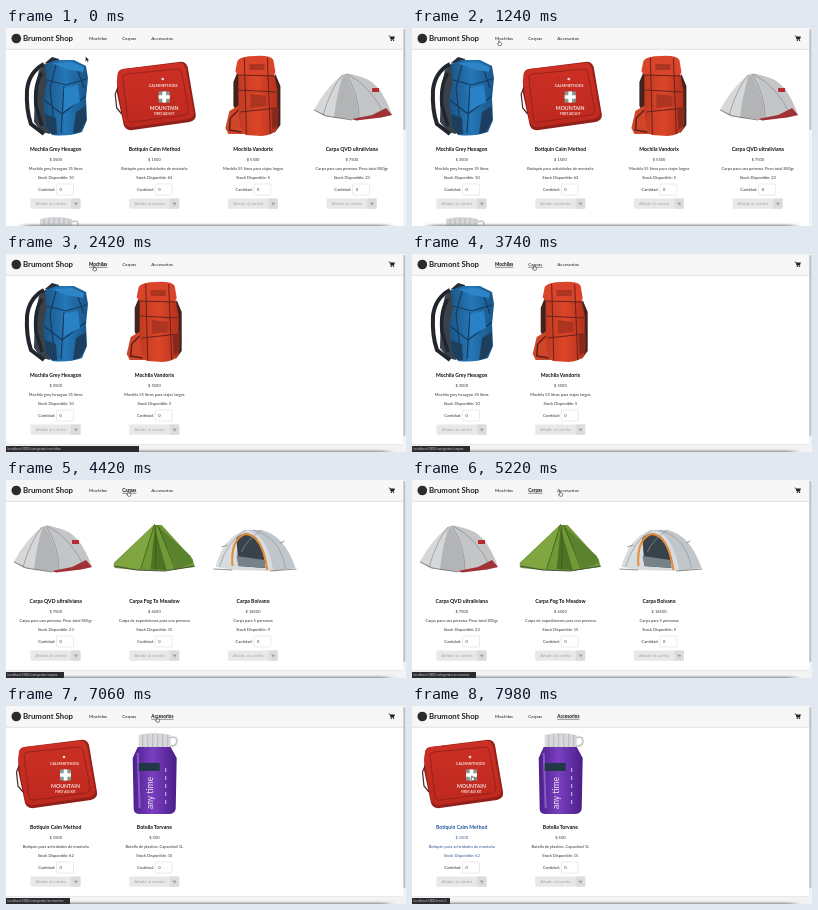
Write an HTML page that moves like this. It is 400 by 198 pixels and loops after 8000 ms.

```html
<!DOCTYPE html>
<html lang="es">
<head>
<meta charset="utf-8">
<title>Brumont Shop</title>
<style>
  html, body { margin: 0; width: 100%; height: 100%; overflow: hidden; background: #fff; }
  svg { display: block; width: 100%; height: 100%; font-family: Lato, sans-serif; }
  .brand { font-size: 7.8px; font-weight: 700; fill: #222; }
  .nav { font-size: 4.6px; fill: #222; }
  .nav.on { font-weight: 700; fill: #111; }
  .card text { font-size: 4px; text-anchor: middle; fill: #333; }
  .card .title { font-size: 5.1px; font-weight: 700; fill: #111; }
  .card .left { text-anchor: start; }
  .card .btn { font-size: 4.4px; fill: #a4a4a4; text-anchor: start; }
  .card.hover .link { fill: #33568a; }
  .card.hover .title { fill: #2859a0; }
  #status text { font: 3.3px Roboto, sans-serif; fill: #c4c4c8; }
</style>
</head>
<body>
<svg viewBox="0 0 400 198" preserveAspectRatio="none">
  <defs>
    <linearGradient id="blue"><stop stop-color="#1c5584"/><stop offset=".5" stop-color="#2477b8"/><stop offset="1" stop-color="#1a5688"/></linearGradient>
    <linearGradient id="red"><stop stop-color="#c23a22"/><stop offset=".5" stop-color="#dc4628"/><stop offset="1" stop-color="#b5301c"/></linearGradient>
    <linearGradient id="kit" x2="0" y2="1"><stop stop-color="#cd3025"/><stop offset="1" stop-color="#bd281e"/></linearGradient>
    <linearGradient id="violet"><stop stop-color="#4c1f8c"/><stop offset=".45" stop-color="#7a3fc0"/><stop offset="1" stop-color="#4a1e88"/></linearGradient>
    <filter id="soft" x="-10%" y="-300%" width="120%" height="700%"><feGaussianBlur stdDeviation="5 1.3"/></filter>
    <g id="cart">
      <path d="M-3 -2.3h1.3l.9 3.4h3" fill="none" stroke="currentColor" stroke-width=".7"/>
      <path d="M-1.6 -1.7h4.8l-.8 2.3h-3.4z" fill="currentColor"/>
      <circle cx="-.4" cy="2.1" r=".65" fill="currentColor"/><circle cx="1.9" cy="2.1" r=".65" fill="currentColor"/>
    </g>

    <g id="bluePack">
      <path d="M40 35L44 48L44 106L36 104L28 94L29 60L33 42Z" fill="#39424b"/>
      <path d="M38 36Q23 44 21 62Q20 82 25 96L38 106" fill="none" stroke="#20262c" stroke-width="4"/>
      <path d="M36 45Q28 56 30 78L36 98" fill="none" stroke="#20262c" stroke-width="3.500"/>
      <path d="M39 35L46 29L53 31L52 37Z" fill="#252d36"/>
      <path d="M39 36L50 32L68 32L80 38L82 50L80 70L81 92L76 104Q62 109 46 107L40 98L37 72L41 54Z" fill="url(#blue)"/>
      <path d="M41 52L60 57L80 51M38 72L56 86L80 68M58 58L55 105M50 37L44 60L49 104M70 37L78 60" fill="none" stroke="#14395c" stroke-width="1.100"/>
      <path d="M39 86L50 90L51 106L45 106L40 98ZM70 84L80 78L80 93L74 104L67 106Z" fill="#1c3f60"/>
      <path d="M58 60L72 57L74 74L58 82Z" fill="#2a82c6"/>
      <path d="M46 35L66 34L78 39L77 44L60 41Z" fill="#2d84c6"/>
    </g>
    <g id="redPack">
      <path d="M34 44L30 54L30 78L36 88L38 46ZM72 46L77 58L77 97L71 105L68 60Z" fill="#42231e"/>
      <path d="M36 77L26 83L22 100L25 106L42 106L42 84Z" fill="#cf4629"/>
      <path d="M35 82L27 90L26 102L38 104" fill="none" stroke="#5a2119" stroke-width="1.500"/>
      <path d="M34 33Q37 28 52 28Q67 27 70 32L72 44L70 49L35 48L32 43Z" fill="#d9442a"/>
      <path d="M35 47L71 47L74 62L74 101Q70 107 58 108L42 107L37 100L35 84Z" fill="url(#red)"/>
      <path d="M34 47L72 48M41 30L43 106M64 30L67 106M35 62L73 64M37 84L74 80" fill="none" stroke="#66231b" stroke-width="1"/>
      <path d="M46 36H61V42H46ZM47 66L63 68V78L47 80Z" fill="#ad3420"/>
      <path d="M68 82L75 78L75 97L69 102Z" fill="#87291c"/>
    </g>
    <g id="kitBag">
      <path d="M13 47Q13 42 18 41L74 34Q81 33 83 39L91 86Q92 92 85 94L28 102Q21 103 19 97L12 64Z" fill="#92201a"/>
      <path d="M13 46Q14 42 19 41L73 35Q79 34 81 40L89 84Q90 89 84 91L28 99Q21 100 19 94L12 54Z" fill="url(#kit)"/>
      <path d="M18 49Q18 47 22 46L73 41Q76 41 77 44L84 82Q84 86 80 87L29 94Q24 95 23 91Z" fill="none" stroke="#8b2019" stroke-width=".8"/>
      <path d="M13 60L10.500 66L12 80L17 86" fill="none" stroke="#4a2626" stroke-width="1.200"/>
      <circle cx="58" cy="51" r="1.300" fill="#f4dcd9"/>
      <g text-anchor="middle" font-weight="700">
        <text x="58.500" y="59" style="font-size:3.7px;fill:#f6e4e2">CALMMETHODS</text>
        <text x="59.500" y="82" style="font-size:5.2px;fill:#f6e4e2">MOUNTAIN</text>
        <text x="59.500" y="86.500" style="font-size:3.2px;fill:#f6e4e2">FIRST AID KIT</text>
      </g>
      <rect x="54" y="63.500" width="11" height="11" fill="#869a92"/>
      <path d="M57.700 63.500h3.600v3.700h3.700v3.600h-3.700v3.700h-3.600v-3.700h-3.700v-3.600h3.700z" fill="#fff"/>
    </g>
    <g id="greyTent">
      <path d="M8 82Q20 60 36 47Q41 44 48 47Q64 50 72 60Q80 70 86 87L78 89L46 92L18 88Z" fill="#c4c5c7"/>
      <path d="M36 47Q31 66 28 90L8 82Q20 60 36 47Z" fill="#d6d7d8"/>
      <path d="M38 46Q52 66 52 91L28 90Q30 66 38 46Z" fill="#b2b4b6"/>
      <path d="M41 46Q65 58 79 88M36 47Q25 60 17 87M40 46Q53 66 53 91" fill="none" stroke="#8b8d90" stroke-width=".7"/>
      <path d="M66 87L80 80L86 87L75 89.500L50 92.500L46 91Z" fill="#a03136"/>
      <path d="M8 82L20 88L46 92" fill="none" stroke="#666" stroke-width=".7"/>
      <rect x="66" y="60" width="7" height="4" fill="#b72b30"/>
    </g>
    <g id="greenTent">
      <path d="M9 83L49 45L57 45L88 79L90 87L60 91L32 90L10 88Z" fill="#6f9a36"/>
      <path d="M49 45L36 89L9 85Z" fill="#80a641"/>
      <path d="M52 45L72 89L88 83L86 76Z" fill="#5b822d"/>
      <path d="M50 47L46 89L62 90L54 62Z" fill="#4d7224"/>
      <path d="M50 44L36 89M53 45L71 90M51 45V90" fill="none" stroke="#395419" stroke-width=".7"/>
      <path d="M9 86L32 90L60 91L90 86" fill="none" stroke="#4c5340" stroke-width="1"/>
    </g>
    <g id="domeTent">
      <path d="M12 87Q20 57 42 50Q67 48 80 67Q88 77 92 88L68 91L30 90Z" fill="#d8dcdf"/>
      <path d="M42 50Q63 51 70 91L92 88Q81 55 58 50Z" fill="#c0c6ca"/>
      <path d="M33 58Q43 49 53 58Q61 69 62 88L35 86Z" fill="#38424b"/>
      <path d="M33 76L61 80L62 88L35 86Z" fill="#77818a"/>
      <path d="M29 86Q27 59 42 54Q59 55 64 90" fill="none" stroke="#e58b35" stroke-width="2"/>
      <path d="M42 50Q24 61 16 87M50 50Q78 58 82 89M58 50Q43 60 38 72" fill="none" stroke="#8e989e" stroke-width=".7"/>
      <path d="M18 67L24 65M77 63L81 61M10 89L29 90M67 91L93 89" stroke="#777" stroke-width=".8"/>
    </g>
    <g id="bottle">
      <path d="M33 41H66L72 52L71 103Q70 108 64 108H35Q29 108 29 103L28 52Z" fill="url(#violet)"/>
      <path d="M34 29Q50 25 66 29V41H34Z" fill="#d7d8da"/>
      <path d="M38 29V41M43 28V41M48 28V41M53 28V41M58 28V41M63 29V41" stroke="#aeb0b3" stroke-width=".8"/>
      <path d="M65 32Q73 29 72 36Q71 41 65 40" fill="none" stroke="#c6c8ca" stroke-width="1.800"/>
      <path d="M33 47L35 102" stroke="#a67de0" stroke-width="2" opacity=".6"/>
      <rect x="34" y="57" width="21" height="8" fill="#233847"/>
      <text transform="translate(48 103) rotate(-90)" style="font-size:8.500px;fill:#eee;text-anchor:start">any time</text>
      <path d="M61 62V66M61 70V74M61 78V82M61 86V90M61 94V98" stroke="#d3c2e9" stroke-width="1"/>
    </g>
  </defs>

  <rect width="400" height="198" fill="#fff"/>
  <g id="pages"></g>
  <use id="nextRow" href="#bottle" y="162"/>
  <g id="footer">
    <rect y="190.500" width="397" height="7.500" fill="#f3f3f3"/>
    <path d="M0 190.500H397" stroke="#e0e0e0" stroke-width=".6"/>
  </g>
  <rect x="18" y="196.800" width="364" height="4" fill="#888" filter="url(#soft)"/>

  <rect width="400" height="21" fill="#f7f7f7"/>
  <path d="M0 21.300H400" stroke="#d5d5d5" stroke-width=".7"/>
  <circle cx="10.300" cy="10.500" r="4.800" fill="#2b2b2b"/>
  <text class="brand" x="17" y="13.200">Brumont Shop</text>
  <g id="nav"></g>
  <use href="#cart" x="385.700" y="10.300" color="#222"/>
  <rect x="397" width="3" height="198" fill="#f3f3f3"/>
  <rect id="thumb" x="397.400" y="1" width="2" rx="1" fill="#bfbfbf"/>

  <g id="status">
    <rect y="192" height="6" fill="#2b2b2f"/>
    <text x="1.500" y="196.300"></text>
  </g>
  <path id="arrow" d="M0 0V5.200L1.300 4.100L2.200 6L3.100 5.600L2.200 3.800H3.900Z" fill="#111" stroke="#fff" stroke-width=".4"/>
  <path id="hand" d="M-.4 0Q.3 -.4 .6 .3V1.500L2.300 2Q2.700 2.200 2.600 2.900L2.100 4.700H-.4L-1.700 3Q-1.400 2.400 -.5 3Z" fill="#fff" stroke="#111" stroke-width=".5"/>
</svg>

<script>
const LOOP = 8000;
const STEP = 98.7;
const $ = id => document.getElementById(id);
const show = (el, on) => el.setAttribute('visibility', on ? 'visible' : 'hidden');

const items = {
  blue: ['bluePack', 'Mochila Grey Hexagon', 3500, 'Mochila grey hexagon 35 litros', 10],
  kit: ['kitBag', 'Botiquin Calm Method', 1500, 'Botiquin para actividades de montaña', 62],
  red: ['redPack', 'Mochila Vandorix', 5500, 'Mochila 55 litros para viajes largos', 5],
  grey: ['greyTent', 'Carpa QVD ultraliviana', 7500, 'Carpa para una persona. Peso total 850gr', 23],
  green: ['greenTent', 'Carpa Fog To Meadow', 6500, 'Carpa de expediciones para una persona', 15],
  dome: ['domeTent', 'Carpa Bolvano', 18500, 'Carpa para 5 personas', 9],
  bottle: ['bottle', 'Botella Torvane', 500, 'Botella de plastico. Capacidad 1L', 15]
};
const pages = [
  { from: 0, link: -1, list: ['blue', 'kit', 'red', 'grey'] },
  { from: 2000, press: 1750, link: 0, list: ['blue', 'red'] },
  { from: 4400, press: 3600, link: 1, list: ['grey', 'green', 'dome'] },
  { from: 6300, press: 6000, link: 2, list: ['kit', 'bottle'] }
];
const links = [['Mochilas', 83, 101.3], ['Carpas', 116.3, 130.5], ['Accesorios', 145.3, 167.5]];
const root = 'localhost:3000/';
const hints = [
  [0, '', 0],
  [1400, root + 'categorias/mochilas', 133],
  [2950, root + 'categorias/carpas', 58],
  [5080, root + 'categorias/accesorios', 64],
  [7340, root + 'item/2', 38]
];
const track = [
  [0, 79.5, 28.5], [820, 79.5, 30], [1180, 87, 12.8], [2100, 88, 12.2], [2600, 88, 12.2],
  [3100, 121, 11.7], [3700, 122, 11.5], [4850, 122.5, 11.5], [5160, 148, 11.5], [5560, 150, 11.5],
  [7080, 151, 11.5], [7500, 61, 65], [7980, 60, 70]
];

function card(key, i) {
  const [photo, title, price, text, stock] = items[key];
  const shift = i === 3 ? 4 : 0;
  return `<g class="card" transform="translate(${i * STEP} 0)">
    <use href="#${photo}" x="${shift}"/>
    <text class="title link" x="49.700" y="122.800">${title}</text>
    <text class="link" x="49.700" y="132.500">$ ${price}</text>
    <text class="link" x="49.700" y="141.900">${text}</text>
    <text class="link" x="49.700" y="151">Stock Disponible: ${stock}</text>
    <text class="left" x="32.200" y="162.500">Cantidad:</text>
    <rect x="50.500" y="156" width="17" height="11" rx="1" fill="#fff" stroke="#ddd" stroke-width=".6"/>
    <text x="54.700" y="162.900">0</text>
    <rect x="24.500" y="170.500" width="50" height="10.300" rx="1" fill="#e8e8e8"/>
    <path d="M65 170.500h8.500q1 0 1 1v8.300q0 1-1 1h-8.500z" fill="#dcdcdc"/>
    <text class="btn" x="29.500" y="177.200">Añade al carrito</text>
    <use href="#cart" transform="translate(69.6 175.700) scale(.62)" color="#999"/>
  </g>`;
}

$('pages').innerHTML = pages.map(p => `<g>${p.list.map(card).join('')}</g>`).join('');
$('nav').innerHTML = links.map(([name, x, end]) =>
  `<text class="nav" x="${x}" y="12.300">${name}</text><path d="M${x} 13.300H${end}" stroke="#222" stroke-width=".5"/>`).join('');

const views = [...$('pages').children];
const labels = [...$('nav').querySelectorAll('text')];
const lines = [...$('nav').querySelectorAll('path')];
const lastKit = views[3].firstElementChild;
const [bubble, hintText] = $('status').children;

function pointer(t) {
  const n = track.findIndex(k => k[0] > t);
  if (n < 0) return track[track.length - 1].slice(1);
  const [t0, x0, y0] = track[n - 1], [t1, x1, y1] = track[n];
  const u = (t - t0) / (t1 - t0), e = u * u * (3 - 2 * u);
  return [x0 + (x1 - x0) * e, y0 + (y1 - y0) * e];
}

function render(t) {
  const current = pages.filter(p => p.from <= t).pop();
  views.forEach((v, i) => show(v, pages[i] === current));
  const home = current.link < 0;
  show($('nextRow'), home);
  show($('footer'), !home);
  $('thumb').setAttribute('height', home ? 101 : 181);

  labels.forEach((label, i) => {
    const active = i === current.link;
    const pressed = t >= pages[i + 1].press && t < pages[i + 1].from;
    label.classList.toggle('on', active);
    show(lines[i], active || pressed);
  });

  const [, url, width] = hints.filter(h => h[0] <= t).pop();
  show($('status'), url);
  bubble.setAttribute('width', width);
  if (hintText.textContent !== url) hintText.textContent = url;

  const [x, y] = pointer(t);
  const onLink = y < 17 && links.some(l => x > l[1] - 1 && x < l[2] + 1);
  const onCard = y > 30 && x < 78;
  lastKit.classList.toggle('hover', t > 7340);
  show($('hand'), onLink || onCard);
  show($('arrow'), !(onLink || onCard));
  for (const id of ['hand', 'arrow']) $(id).setAttribute('transform', `translate(${x} ${y})`);
}

const start = performance.now();
function tick() {
  render((performance.now() - start) % LOOP);
  requestAnimationFrame(tick);
}
tick();
</script>
</body>
</html>
```
